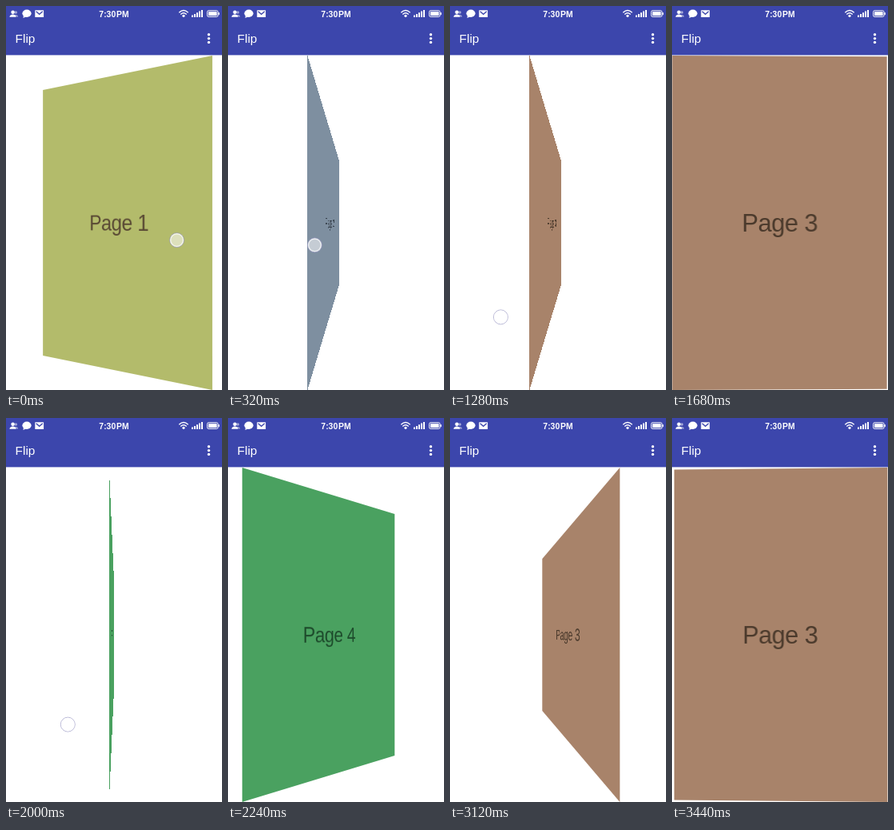
Recreate the animation shown at these times as an HTML page. Size 270x480 px, loop 3520 ms.

```html
<!DOCTYPE html>
<html lang="en">
<head>
<meta charset="utf-8">
<title>Flip</title>
<style>
  html, body { margin: 0; width: 100%; height: 100%; overflow: hidden; background: #fff; }
  #stage { position: absolute; left: 0; top: 0; width: 270px; height: 480px; overflow: hidden;
    font-family: "Liberation Sans", Arial, sans-serif; }
  #page { position: absolute; left: 0; top: 62px; width: 270px; height: 418px;
    font-size: 31px; letter-spacing: -.5px; line-height: 419px; text-align: center; white-space: nowrap; }
  svg { position: absolute; left: 0; top: 0; }
</style>
</head>
<body>
<div id="stage">
  <div id="page"></div>
  <svg width="270" height="480" fill="#fff">
    <rect width="270" height="61.4" fill="#3c46ac"/>
    <!-- contacts, chat, mail -->
    <g opacity=".5"><circle cx="12.3" cy="8" r="1.8"/><path d="M11 13.5V11Q15 10.5 15.2 13.5z"/></g>
    <circle cx="8.6" cy="7.8" r="2.3"/>
    <path d="M4.5 13.7Q4.5 11 8 10.4H9.2Q12.4 11 12.4 13.7z"/>
    <ellipse cx="26" cy="9.2" rx="5.6" ry="4.7"/>
    <path d="M22 11L21.5 15L26 13z"/>
    <rect x="36.3" y="5.2" width="10.8" height="8.8" rx=".6"/>
    <path d="M37.6 6.8L41.7 10.3L45.8 6.8" fill="none" stroke="#3c46ac" stroke-width="1.3"/>
    <text x="135" y="13.7" font-size="10.4" font-weight="700" text-anchor="middle">7:30&#8202;PM</text>
    <!-- wifi, signal, battery -->
    <g fill="none" stroke="#fff" stroke-width="1.4">
      <path d="M216.3 8.2Q222 2.8 227.7 8.2M218.3 10.4Q222 7 225.7 10.4"/>
      <rect x="251.6" y="5.8" width="13.4" height="7.6" rx="1.6" stroke-width="1"/>
    </g>
    <circle cx="222" cy="12.3" r="1.6"/>
    <path d="M232 11.5h2V14h-2zM235 10h2v4h-2zM238 8.3h2V14h-2zM241 6.6h2V14h-2zM244 5h2v9h-2z"/>
    <rect x="253" y="7.2" width="10.6" height="4.8"/>
    <rect x="265.3" y="8" width="1.5" height="3.2" rx=".7"/>
    <text x="11.6" y="46" font-size="15.4">Flip</text>
    <circle cx="253.5" cy="35.8" r="1.7"/><circle cx="253.5" cy="40.6" r="1.7"/><circle cx="253.5" cy="45.4" r="1.7"/>
    <g id="touch">
      <circle r="9" fill-opacity=".55" stroke="#8e8cbc" stroke-opacity=".6"/>
      <circle r="7.8" fill="none" stroke="#fff" stroke-opacity=".7" stroke-width="1.3"/>
    </g>
  </svg>
</div>
<script>
const LOOP = 3520, STEP = 80, WIDTH = 270;
const RELEASE = .554, SETTLE = 650; // progress when the finger lifts, time to settle after it
const page = document.getElementById('page');
const touch = document.getElementById('touch');

const pages = [
  { back: '#b3bb6b', ink: '#594934' },
  { back: '#7e8fa0', ink: '#39434e' },
  { back: '#a8836a', ink: '#4b3a2c' },
  { back: '#4aa160', ink: '#1d4a2b' }
];

const swipes = [
  { down: -76, up: 320, dir: 1, x: 258, y: 290 },
  { down: 884, up: 1280, dir: 1, x: 213, y: 380 },
  { down: 1760, up: 2087, dir: 1, x: 214, y: 375 },
  { down: 2571, up: 3071, dir: -1, x: 34, y: 359 }
];

const clamp = n => Math.min(Math.max(n, 0), 1);

// the finger slows down while dragging, then the page eases home
function progress({ down, up }, t) {
  if (t <= up) return RELEASE * Math.sin(clamp((t - down) / (up - down)) * Math.PI / 2);
  return 1 - (1 - RELEASE) * (1 - clamp((t - up) / SETTLE)) ** 3;
}

function flip(pos) {
  const i = Math.round(pos), side = pos > i ? 1 : -1;
  const angle = Math.abs(pos - i) * Math.PI;
  const cos = Math.cos(angle), sin2 = Math.sin(angle) ** 2;
  // the near edge keeps full height, the far one is 1 + depth away
  const g = .469 * sin2, depth = 2 * g / (1 - g), mid = 1 + depth / 2;
  const shift = side * mid * 22 * sin2 * Math.max(cos, 0) ** .63;
  page.textContent = 'Page ' + (i + 1);
  page.style.background = pages[i].back;
  page.style.color = pages[i].ink;
  const m = [cos, 0, 0, -side * depth / WIDTH, 0, 1, 0, 0, 0, 0, 1, 0, shift, 0, 0, mid];
  page.style.transform = `matrix3d(${m.map(n => n.toFixed(8))})`;
}

function draw(now) {
  const t = Math.floor(now % LOOP / STEP) * STEP;
  flip(swipes.reduce((sum, s) => sum + s.dir * progress(s, t), 0));
  const s = swipes.find(s => t >= s.down && t <= s.up);
  touch.style.display = s ? '' : 'none';
  if (s) {
    const p = progress(s, t);
    touch.setAttribute('transform', `translate(${s.x - s.dir * WIDTH * p} ${s.y + 16 * p})`);
  }
}

let start;
function tick(now) {
  start ??= now;
  draw(now - start);
  requestAnimationFrame(tick);
}
draw(0);
requestAnimationFrame(tick);
</script>
</body>
</html>
```
